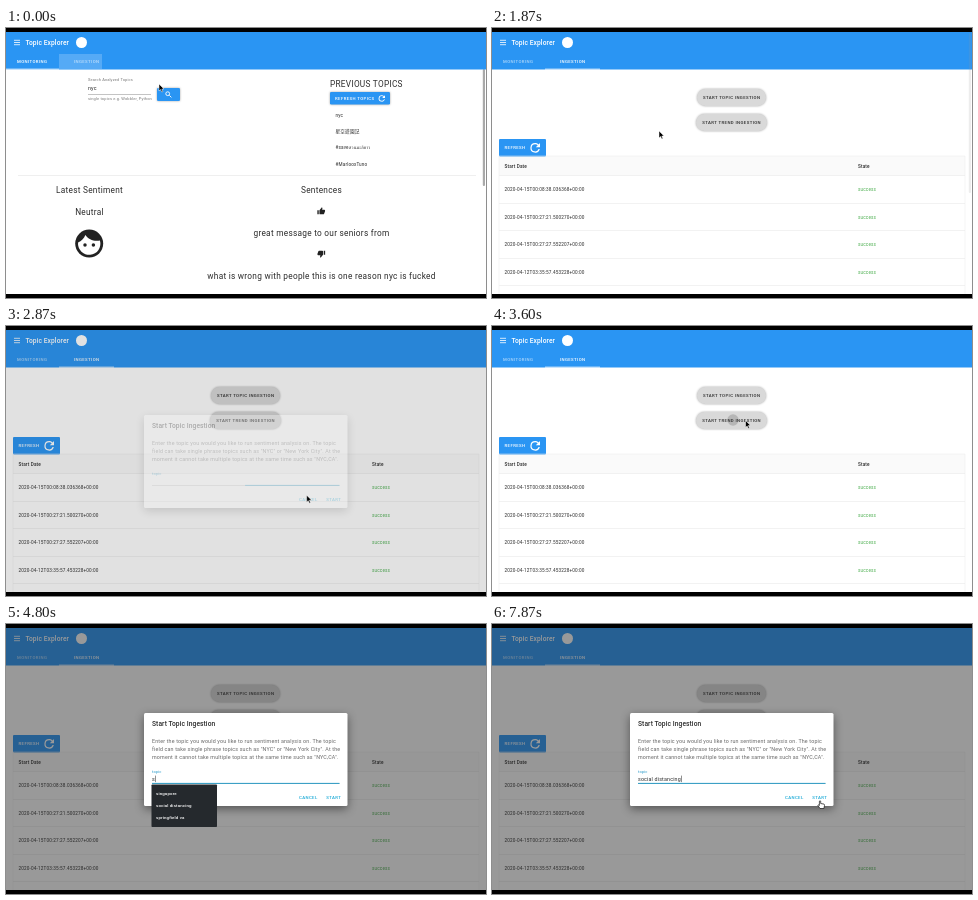
An HTML page for the animation above (8 s loop, 480 px wide and 270 px high).

```html
<!DOCTYPE html>
<html lang="en">
<head>
<meta charset="utf-8">
<title>Topic ingestion demo</title>
<style>
html, body { margin: 0; width: 100%; height: 100%; overflow: hidden; background: #000; }
svg { display: block; }
text { font: 4.67px Roboto, "Noto Sans", "Noto Sans CJK JP", sans-serif; letter-spacing: .03125em; fill: #2c2c2c; white-space: pre; }
.btn { font-size: 4.3px; font-weight: 500; letter-spacing: .09em; }
.title { font-size: 6.67px; font-weight: 500; letter-spacing: .0125em; }
.body { font-size: 5.33px; fill: #666; }
.input { font-size: 5.33px; }
.small { font-size: 4px; fill: #777; }
.big { font-size: 8.3px; }
.menu { font-size: 4.4px; font-weight: 500; fill: #fff; }
.th { font-weight: 500; }
.mid { text-anchor: middle; }
.white { fill: #fff; }
.link { fill: #19a9d6; }
.ok { fill: #4caf50; }
.blue { fill: #2a95f3; }
.line { fill: #e4e4e4; }
.raised { filter: drop-shadow(0 .8px .8px rgba(0,0,0,.35)); }
.modal { filter: drop-shadow(0 3px 5px rgba(0,0,0,.45)); }
</style>
</head>
<body>
<svg width="480" height="270" viewBox="0 0 480 270">
  <defs>
    <path id="reload" d="M17.65 6.35C16.2 4.9 14.21 4 12 4A8 8 0 1 0 19.73 14H17.65A6 6 0 1 1 12 6C13.66 6 15.14 6.69 16.22 7.78L13 11H20V4Z" fill="#fff"/>
    <path id="thumb" d="M1 9H5V21H1ZM7 9L14 1L15.6 3L14.7 8H21Q23 8 23 10V12L20 20Q19.5 21 18 21H9Q7 21 7 19Z" fill="#222"/>
  </defs>
  <rect width="480" height="270" fill="#fff"/>

  <g id="page">
    <g id="monitoring">
      <text class="small" x="82" y="53.4">Search Analyzed Topics</text>
      <text class="input" x="82" y="62.4">nyc</text>
      <rect x="82" y="66" width="63" height=".5" fill="#888"/>
      <text class="small" x="82" y="71.6">single topics e.g. Wobbler, Python</text>
      <rect class="blue raised" x="151" y="60" width="23" height="13" rx="1.3"/>
      <path d="M163.3 67.3L165.400 69.400M163.600 65.700a1.900 1.900 0 1 1-3.800 0a1.900 1.900 0 1 1 3.800 0" fill="none" stroke="#fff" stroke-width=".9"/>
      <text class="big" x="324" y="59.3">PREVIOUS TOPICS</text>
      <rect class="blue raised" x="324" y="64" width="60" height="12.500" rx="1.300"/>
      <text class="btn white" x="329" y="71.800">REFRESH TOPICS</text>
      <use href="#reload" transform="translate(371 65.600) scale(.4)"/>
      <g id="topics"></g>
      <rect class="line" x="12" y="147" width="458" height=".6"/>
      <text class="big mid" x="83.500" y="165">Latest Sentiment</text>
      <text class="big mid" x="83.500" y="186.800">Neutral</text>
      <g transform="translate(66.400 198.800) scale(1.4)">
        <circle cx="12" cy="12" r="10" fill="#222"/>
        <path d="M4.050 11.140C6.410 10.090 8.280 8.160 9.260 5.770C11.070 8.330 14.050 10 17.420 10C18.200 10 18.950 9.910 19.670 9.740A8 8 0 1 1 4.050 11.140Z" fill="#fff"/>
        <circle cx="9" cy="13" r="1.250" fill="#222"/><circle cx="15" cy="13" r="1.250" fill="#222"/>
      </g>
      <text class="big mid" x="315.500" y="165">Sentences</text>
      <use href="#thumb" transform="translate(311 179) scale(.35)"/>
      <text class="big mid" x="315.500" y="208.300">great message to our seniors from</text>
      <use href="#thumb" transform="translate(319.500 230) scale(-.35)"/>
      <text class="big mid" x="315.500" y="251">what is wrong with people this is one reason nyc is fucked</text>
      <rect x="476.800" y="41" width="2.200" height="117" rx="1" fill="#aaa"/>
    </g>

    <g id="ingestion">
      <rect y="41" width="480" height="330" fill="#fff"/>
      <rect class="raised" x="205" y="61" width="69" height="17" rx="8.500" fill="#d9d9d9"/>
      <text class="btn mid" x="239.700" y="71">START TOPIC INGESTION</text>
      <rect class="raised" x="204" y="86" width="71" height="17" rx="8.500" fill="#d9d9d9"/>
      <circle id="ripple" cx="241" cy="94" fill="#000" opacity=".16"/>
      <text class="btn mid" x="239.700" y="96.200">START TREND INGESTION</text>
      <rect x="7" y="128" width="466" height="19.500" fill="#fafafa"/>
      <rect class="blue" x="7" y="111" width="47" height="17.500" rx="1"/>
      <text class="btn white" x="12.500" y="121.400">REFRESH</text>
      <use href="#reload" transform="translate(36 112.600) scale(.6)"/>
      <text class="th" x="12.500" y="139.800">Start Date</text>
      <text class="th" x="366" y="139.800">State</text>
      <g id="rows"></g>
    </g>

    <rect class="blue" y="-20" width="480" height="61.500"/>
    <path d="M8 12.300H14M8 14.500H14M8 16.700H14" stroke="#fff" stroke-width=".8"/>
    <text class="title white" x="19.500" y="16.900">Topic Explorer</text>
    <circle cx="75.500" cy="14.500" r="5.500" fill="#fff"/>
    <rect id="hover" x="53" y="26" width="43" height="15" fill="#fff" opacity=".2"/>
    <text id="tab1" class="btn white mid" x="26.200" y="35.200">MONITORING</text>
    <text id="tab2" class="btn white mid" x="80.700" y="35.200">INGESTION</text>
    <rect id="slider" y="40.700" height=".8" fill="#fff"/>
  </g>
  <rect id="bar" x="476.800" width="2.200" height="160" rx="1" fill="#999"/>

  <rect id="shade" width="480" height="270" fill="#212121"/>

  <g id="topicDialog">
    <rect class="modal" x="138" y="89" width="203.500" height="93" rx="1.500" fill="#fff"/>
    <text class="title" x="146" y="102.400">Start Topic Ingestion</text>
    <text class="body" x="146" y="119.400">Enter the topic you would you like to run sentiment analysis on. The topic</text>
    <text class="body" x="146" y="127.400">field can take single phrase topics such as "NYC" or "New York City". At the</text>
    <text class="body" x="146" y="135.400">moment it cannot take multiple topics at the same time such as "NYC,CA".</text>
    <text class="small link" x="146" y="149.400" style="fill:#2196c8">topic</text>
    <text id="typed" class="input" x="146" y="156.700"></text>
    <rect id="caret" y="151.600" width=".5" height="6.500" fill="#222"/>
    <rect x="146" y="159.200" width="187.500" height=".5" fill="#9a9a9a"/>
    <rect id="focusLine" y="158.900" height=".9" fill="#1a96c4"/>
    <text class="btn link" x="293" y="174.600">CANCEL</text>
    <text class="btn link" x="320.300" y="174.600">START</text>
    <g id="menu">
      <rect x="145.500" y="160.500" width="65.500" height="42.500" rx=".8" fill="#25292d"/>
      <text class="menu" x="150" y="171.200">singapore</text>
      <text class="menu" x="150" y="183.200">social distancing</text>
      <text class="menu" x="150" y="195.200">springfield va</text>
    </g>
  </g>

  <g id="trendDialog">
    <rect class="modal" x="144" y="107" width="191.500" height="57" rx="1.500" fill="#fff"/>
    <text class="title" x="152" y="120.200">Start Trend Ingestion</text>
    <text class="body" x="152" y="137">Run sentiment analysis on the top 5 globally trending topics on wobbler.</text>
    <text class="btn link" x="287" y="156.800">CANCEL</text>
    <text class="btn link" x="314.300" y="156.800">START</text>
  </g>

  <circle id="ring" r="14.300" fill="#fff" fill-opacity=".45" stroke="#111" stroke-width="1.300"/>
  <g id="cursor" stroke="#fff" stroke-width=".5">
    <path id="arrow" d="M0 0V7L1.600 5.500L2.800 8L3.900 7.500L2.800 5H5Z" fill="#000"/>
    <path id="hand" d="M-.6 .6Q0-.4.7.6V3L4 3.600Q4.700 4 4.500 5L3.900 8H0L-2.200 4.800Q-1.700 3.900-.6 5Z" fill="#fff" stroke="#111" stroke-width=".7"/>
  </g>
  <path d="M0 0H480V4H0ZM0 266H480V270H0Z"/>
</svg>

<script>
const LOOP = 8000;
const el = Object.fromEntries([...document.querySelectorAll('[id]')].map(e => [e.id, e]));
const set = (e, attrs) => { for (const k in attrs) e.setAttribute(k, attrs[k]); };
const show = (e, on) => set(e, { visibility: on ? 'visible' : 'hidden' });
const ramp = (t, a, b) => Math.min(1, Math.max(0, (t - a) / (b - a)));
const ease = p => p * p * (3 - 2 * p);
const within = (t, spans) => spans.some(([a, b]) => t >= a && t < b);

// Eased value along keys of the form [time, ...values]
function along(keys, t) {
  let i = keys.findIndex(k => k[0] > t);
  if (i < 0) return keys[keys.length - 1].slice(1);
  const a = keys[Math.max(0, i - 1)], b = keys[i];
  const p = ease(ramp(t, a[0], b[0]));
  return a.slice(1).map((v, n) => v + (b[n + 1] - v) * p);
}

el.topics.innerHTML = ['nyc', '星空遊園記', '#saveสวนมะลิขาว', '#MarlooxTuno']
  .map((s, i) => `<text x="329.500" y="${88.600 + 16.300 * i}">${s}</text>`).join('');

el.rows.innerHTML = [
  '15T00:08:38.036368', '15T00:27:21.500270', '15T00:27:27.552207',
  '12T03:35:57.453228', '11T19:11:23.439908', '11T18:42:10.271845'
].map((s, i) => {
  const y = 147.500 + 27.500 * i;
  return `<rect class="line" x="7" y="${y}" width="466" height=".5"/>
    <text x="12.500" y="${y + 15.500}">2020-04-${s}+00:00</text>
    <text class="ok" x="366" y="${y + 15.500}">success</text>`;
}).join('') + '<path d="M7 128V320M473 128V320M7 128H473" fill="none" stroke="#e8e8e8" stroke-width=".5"/>';

const pointer = [
  [70, 153, 56], [400, 167, 103], [1870, 167, 103], [2070, 238, 70], [2200, 238, 70],
  [2400, 304, 174.500], [2800, 304, 174.500], [3250, 253.500, 94.500], [3600, 253.500, 94.500],
  [3670, 301, 155], [4400, 301, 155], [4530, 240, 70], [4620, 240, 70], [4720, 185, 156],
  [7000, 205, 162], [7200, 205, 162], [7600, 305, 175], [7800, 328, 176.500]
];
const scroll = [[1000, 0], [1070, 10], [1200, 10], [1400, 24], [1650, 0]];
const clicks = [[2070, 2200, 240, 70], [2600, 2800, 302, 173], [4000, 4200, 300.500, 153.500], [4540, 4640, 240, 70]];
const phrase = 'social distancing';
const keyTimes = [4800, 5000, 5200, 5400, 5600, 5800, 6000, 6130, 6270, 6400, 6470, 6530, 6600, 6800, 6870, 7000, 7130];

function drawPage(t) {
  const swap = ramp(t, 70, 200), [y] = along(scroll, t), s = ease(ramp(t, 70, 300));
  set(el.page, { transform: `translate(0 ${-y})` });
  show(el.monitoring, swap < 1);
  set(el.ingestion, { opacity: swap });
  set(el.hover, { opacity: .2 * (1 - ramp(t, 70, 400)) });
  set(el.tab1, { opacity: 1 - .4 * swap });
  set(el.tab2, { opacity: .6 + .4 * swap });
  set(el.slider, { x: 53 * s, width: 53 + 2 * s });
  set(el.bar, { y: 5 + y * .6, opacity: ramp(t, 1000, 1050) * (1 - ramp(t, 1730, 1900)) });
  set(el.ripple, { r: t >= 3470 && t < 3670 ? 6 * ramp(t, 3450, 3610) : 0 });
}

function drawDialogs(t) {
  const topic = t < 4000 ? ramp(t, 2200, 2300) - ramp(t, 2800, 2900) : ramp(t, 4640, 4720);
  const trend = t < 3670 ? 0 : 1 - ramp(t, 4400, 4470);
  set(el.topicDialog, { opacity: topic });
  set(el.trendDialog, { opacity: trend });
  set(el.shade, { opacity: .46 * Math.max(topic, trend) });

  const text = phrase.slice(0, keyTimes.filter(k => t >= k).length);
  el.typed.textContent = text;
  set(el.caret, { x: 146.200 + (text ? el.typed.getComputedTextLength() : 0) });
  show(el.caret, within(t, [[2300, 2600], [4700, LOOP]]));
  const lost = t < 4000 ? 187.500 * ramp(t, 2600, 3146) : 187.500 * (1 - ramp(t, 4680, 4790));
  set(el.focusLine, { x: 146 + lost, width: 187.500 - lost });
  show(el.menu, t >= 4800 && t < 5130);
}

function drawPointer(t) {
  const [x, y] = along(pointer, t);
  const hand = within(t, [[2030, 2850], [3670, 4440], [4510, 4660], [7550, LOOP]]);
  const seen = t < 4700 || t >= 7200;
  set(el.cursor, { transform: `translate(${x} ${y})` });
  show(el.arrow, seen && !hand);
  show(el.hand, seen && hand);
  const click = clicks.find(c => t >= c[0] && t < c[1]);
  show(el.ring, click);
  if (click) set(el.ring, { cx: click[2], cy: click[3] });
}

const start = performance.now();
function frame() {
  const t = (performance.now() - start) % LOOP;
  drawPage(t);
  drawDialogs(t);
  drawPointer(t);
  requestAnimationFrame(frame);
}
frame();
</script>
</body>
</html>
```
